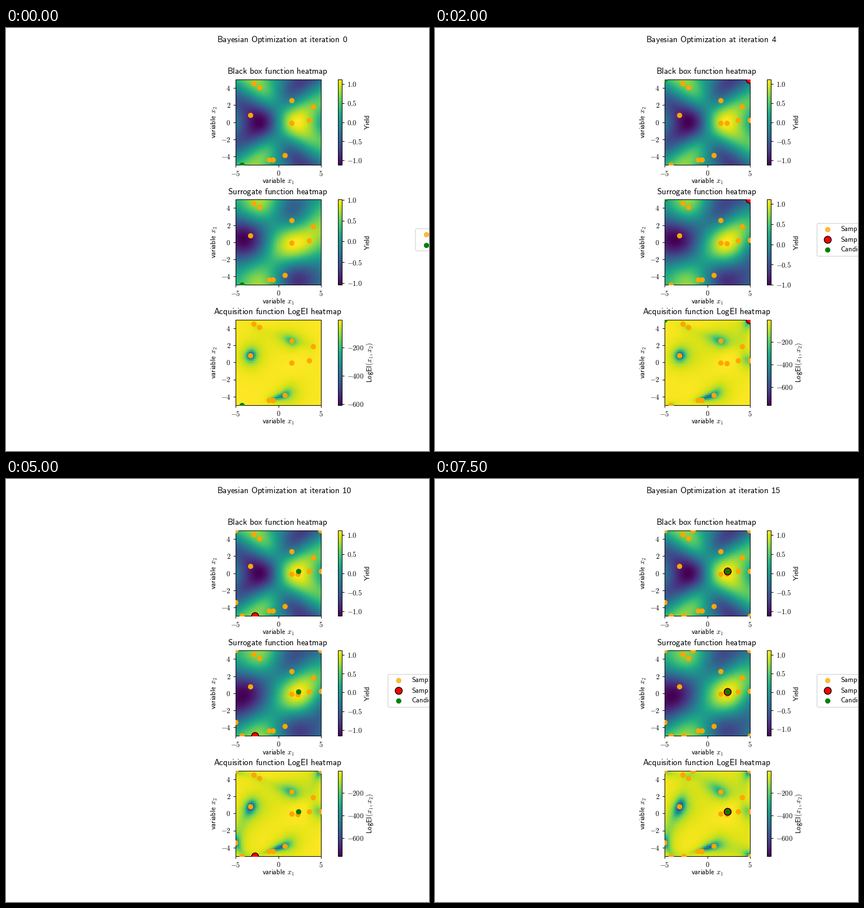
Write a matplotlib script that moves like this. It is 748 by 748 pixels and loops after 8 s.

```python
import numpy as np
import matplotlib.pyplot as plt
from matplotlib.animation import FuncAnimation
from matplotlib.patches import FancyBboxPatch
from matplotlib.ticker import FuncFormatter

plt.rcParams["mathtext.fontset"] = "cm"
plt.rcParams["font.family"] = "Liberation Sans"

SIZE, DPI = 748, 100
PT = 72 / DPI                      # points per pixel
SMALL, LARGE, LINE = 12.5 * PT, 15 * PT, 0.72
LEFT, TOP, SIDE, PITCH = 406, 91, 151, 212.4
STEPS = 16

# Gaussian process: length scales of mean and spread, noise, prior variance
MEAN_SCALE, SPREAD_SCALE, NOISE, VARIANCE = 2.4, 3.3, 0.005, 0.6

INITIAL = [(-2.9, 4.53), (-2.23, 4.1), (-3.28, 0.8), (1.55, 2.55), (1.55, -0.07),
           (3.6, 0.2), (4.1, 1.85), (0.75, -3.85), (-1.1, -4.4), (-0.6, -4.4)]
PEAK = (2.38, 0.22)
CANDIDATES = [(-4.25, -5), (5, 0.25), (2.3, -0.13), (4.95, 5), (-5, 5), PEAK, PEAK, PEAK,
              (-5, -3.4), (-2.75, -5), PEAK, PEAK, (-1.7, 5), (5, -5), PEAK, PEAK]

axis = np.linspace(-5, 5, 50)
X, Y = np.meshgrid(axis, axis)
GRID = np.column_stack([X.ravel(), Y.ravel()])


def black_box(x, y):
    phase = (0.76 * x - 0.035 * x * np.abs(x)) / (1 + 0.05 * y ** 2)
    return 1.127 * np.sin(phase) * np.cos(np.pi / 2 * y / np.sqrt(4.3 + 0.55 * x ** 2))


def kernel(a, b, scale):
    gap = a[:, None, :] - b[None, :, :]
    return np.exp(-0.5 * (gap ** 2).sum(axis=2) / scale ** 2)


def weights(points, scale):
    """Kernel between grid and points, and the same times the inverse covariance."""
    cross = kernel(GRID, points, scale)
    cov = kernel(points, points, scale) + NOISE * np.eye(len(points))
    return cross, np.linalg.solve(cov, cross.T).T


def model(k):
    """Surrogate mean and log expected improvement after k iterations."""
    points = np.array(INITIAL + CANDIDATES[:k])
    values = black_box(*points.T)
    mean = weights(points, MEAN_SCALE)[1] @ values
    cross, w = weights(points, SPREAD_SCALE)
    sigma = np.sqrt(VARIANCE * np.maximum(1 - (cross * w).sum(axis=1), NOISE / 4))
    u = np.minimum((mean - values.max()) / sigma, 0)
    log_ei = np.log(sigma) - u ** 2 / 2 - np.log(2.5 * (1 + u ** 2))
    depth = 760 if k else 608
    log_ei *= depth / -log_ei.min()
    return mean.reshape(X.shape), log_ei.reshape(X.shape)


def sans(text):
    return r"\mathsf{" + text.replace(" ", r"\hspace{0.38}") + "}"


def numbers(digits):
    return FuncFormatter(lambda v, _: f"${v:.{digits}f}$")


fig = plt.figure(figsize=(SIZE / DPI, SIZE / DPI), dpi=DPI, facecolor="white")
page = fig.add_axes([0, 0, 1, 1])
page.set(xlim=(0, SIZE), ylim=(SIZE, 0))
page.axis("off")


def put(x, y, text, size=SMALL, ha="center", rotation=0):
    return page.text(x, y, text, fontsize=size, ha=ha, va="baseline",
                     rotation=rotation, rotation_mode="anchor")


def box(x, top, width):
    return fig.add_axes([x / SIZE, 1 - (top + SIDE) / SIZE, width / SIZE, SIDE / SIZE])


def panel(row, title, label, label_x, ticks, digits):
    top = TOP + row * PITCH
    ax = box(LEFT, top, SIDE)
    im = ax.imshow(np.zeros_like(X), origin="lower", extent=(-5, 5, -5, 5),
                   aspect="auto", cmap="viridis", interpolation="nearest")
    ax.set_xticks([-5, 0, 5])
    ax.set_yticks([-4, -2, 0, 2, 4])
    ax.xaxis.set_major_formatter(numbers(0))
    ax.yaxis.set_major_formatter(numbers(0))
    bar = fig.colorbar(im, cax=box(586.5, top, 7.6), ticks=ticks, format=numbers(digits))
    bar.outline.set_linewidth(LINE)
    for a in (ax, bar.ax):
        a.tick_params(length=3.15, width=LINE, pad=3.15, labelsize=SMALL)
    for spine in ax.spines.values():
        spine.set_linewidth(LINE)

    middle = top + SIDE / 2
    put(480.5, top - 9.7, f"${sans(title)}$", LARGE)
    put(481.5, top + SIDE + 33, f"${sans('variable ')}x_1$")
    put(371.5, middle, f"${sans('variable ')}x_2$", rotation=90)
    put(label_x, middle, label, rotation=90)

    dots = [ax.scatter([], [], s=32, color="orange", zorder=3),
            ax.scatter([], [], s=80, color="red", edgecolors="black", zorder=4),
            ax.scatter([], [], s=32, color="green", zorder=5)]
    ax.set(xlim=(-5, 5), ylim=(-5, 5))
    return im, dots


def show(im, data):
    im.set_data(data)
    im.set_clim(data.min(), data.max())


YIELD = f"${sans('Yield')}$"
YIELD_TICKS = [-1, -0.5, 0, 0.5, 1]
panels = [
    panel(0, "Black box function heatmap", YIELD, 643.5, YIELD_TICKS, 1),
    panel(1, "Surrogate function heatmap", YIELD, 643.5, YIELD_TICKS, 1),
    panel(2, "Acquisition function LogEI heatmap",
          f"${sans('LogEI')}(x_1, x_2)$", 647, [-800, -600, -400, -200], 0),
]
show(panels[0][0], black_box(X, Y))

put(373.5, 25.3, f"${sans('Bayesian Optimization at iteration')}$", LARGE, "left")
counter = put(595.3, 25.3, "0", 13.6 * PT, "left")


def legend(x, top, bottom, rows):
    frame = FancyBboxPatch((x, top), 160, bottom - top,
                           boxstyle="round,pad=0,rounding_size=2.5",
                           fc="white", ec="0.8", lw=LINE)
    parts = [page.add_patch(frame)]
    for y, color, edge, size, alpha, text in rows:
        parts.append(page.scatter([x + 18.7], [y], s=size, color=color,
                                  edgecolors=edge, alpha=alpha, zorder=3))
        parts.append(put(x + 41.5, y + 3.2, f"${sans(text)}$", ha="left"))
    return parts


def sampled(y):
    return y, "orange", "orange", 32, 0.75, "Sampled points"


def candidate(y):
    return y, "green", "green", 32, 1, "Candidate point"


first_legend = legend(724, 355, 394, [sampled(365), candidate(384)])
full_legend = legend(675.5, 345.5, 403.5, [
    sampled(356), (374.3, "red", "black", 80, 1, "Sampled candidate"), candidate(392.2)])


def update(k):
    counter.set_text(str(k))
    for part in first_legend:
        part.set_visible(k == 0)
    for part in full_legend:
        part.set_visible(k > 0)

    for (im, _), data in zip(panels[1:], model(k)):
        show(im, data)

    known = INITIAL + CANDIDATES[:max(k - 1, 0)]
    latest = [CANDIDATES[k - 1]] if k else np.empty((0, 2))
    for _, dots in panels:
        for dot, points in zip(dots, (known, latest, [CANDIDATES[k]])):
            dot.set_offsets(points)
    return []


anim = FuncAnimation(fig, update, frames=STEPS, interval=500, repeat=True,
                     repeat_delay=0, blit=False)
plt.show()
```
